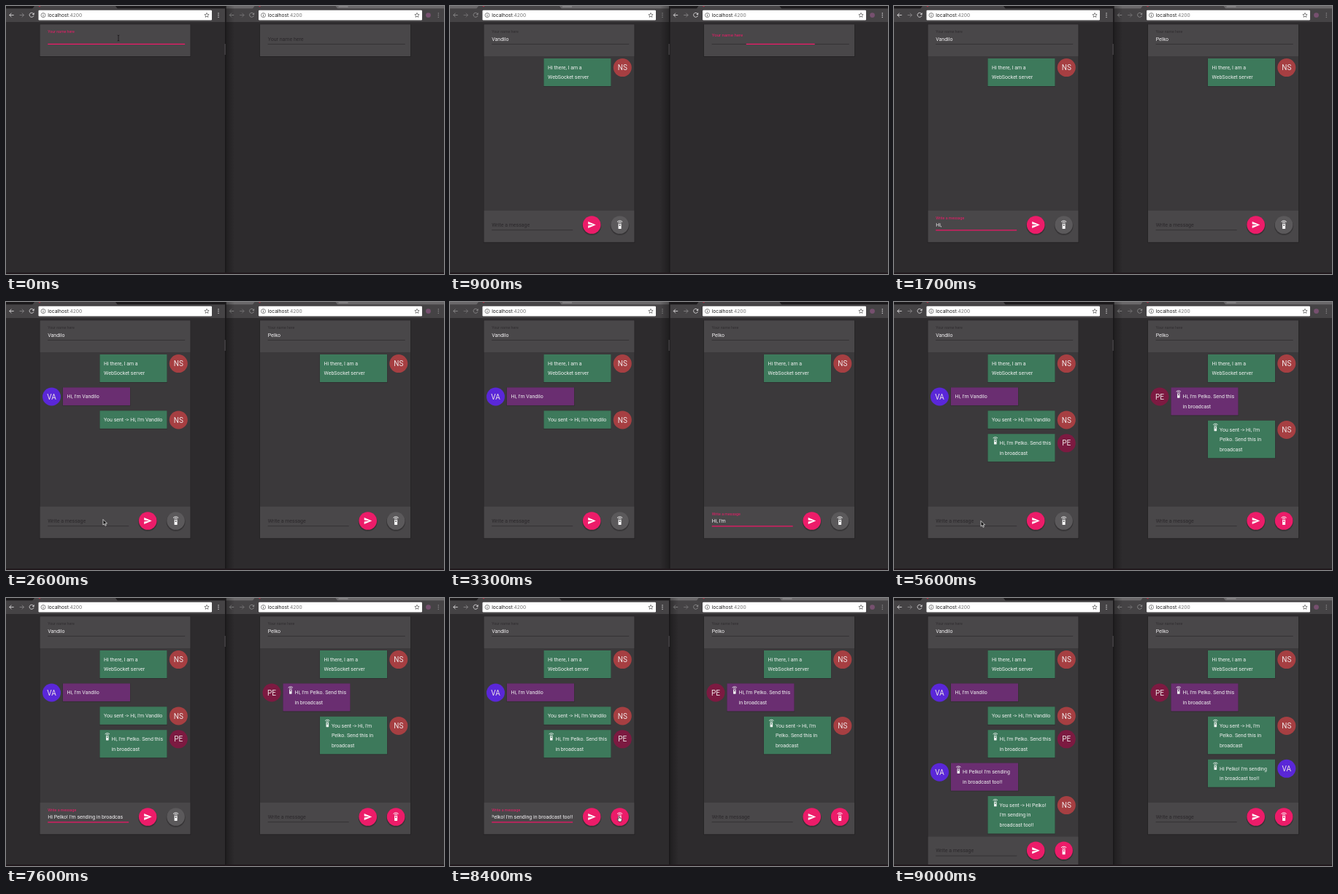
An HTML page that plays this animation: 600 px wide and 368 px high, repeating every 9100 ms.

```html
<!DOCTYPE html>
<html lang="en">
<head>
<meta charset="utf-8">
<title>Two chat windows</title>
<style>
html, body { margin: 0; width: 100%; height: 100%; overflow: hidden; background: #2d2b2d; }
#stage { display: block; width: 600px; height: 368px; }
text { font-family: Roboto, "Open Sans", sans-serif; font-size: 7px; white-space: pre; }
.url { font-family: Inter, Roboto, sans-serif; font-size: 6.65px; }
.initials { font-size: 10px; text-anchor: middle; fill: #eee4e6; }
</style>
</head>
<body>
<svg id="stage" viewBox="0 0 600 368" xmlns="http://www.w3.org/2000/svg"></svg>
<script>
const LOOP = 9100, STEP = 100;
const PINK = '#ec1c69', GREEN = '#3d795b', PURPLE = '#6a2e71';
const PAGE = '#2d2b2d', CARD = '#494749', CHAT = '#3b393b';
const SECOND_X = 301.5;

const stage = document.getElementById('stage');
const pen = document.createElement('canvas').getContext('2d');

const people = {
  server: { initials: 'NS', color: '#a63f42' },
  left: { initials: 'VA', color: '#5a27d8' },
  right: { initials: 'PE', color: '#7c1a41' }
};

// Typing runs: text appears evenly between from and to, and is cleared at end.
const sides = {
  left: {
    dx: 0, who: 'left', barEnd: 282,
    name: { text: 'Vandilo', from: 50, to: 450, focus: [[-500, 650]] },
    open: 600,
    drafts: [
      { text: "Hi, I'm Vandilo", from: 1500, to: 2250, end: 2400 },
      { text: "Hi Pelko! I'm sending in broadcast too!!", from: 5850, to: 7950, end: 8600 }
    ],
    draftFocus: [[1400, 2600], [5700, 8500]],
    castAt: 8400,
    messages: [
      { at: 700, from: 'server', lines: ['Hi there, I am a', 'WebSocket server'] },
      { at: 2400, from: 'left', lines: ["Hi, I'm Vandilo"] },
      { at: 2500, from: 'server', lines: ["You sent -> Hi, I'm Vandilo"] },
      { at: 5300, from: 'right', cast: true, lines: ["Hi, I'm Pelko. Send this", 'in broadcast'] },
      { at: 8600, from: 'left', cast: true, lines: ["Hi Pelko! I'm sending", 'in broadcast too!!'] },
      { at: 8700, from: 'server', cast: true, lines: ['You sent -> Hi Pelko!', "I'm sending in", 'broadcast too!!'] }
    ]
  },
  right: {
    dx: SECOND_X, who: 'right', barEnd: 268.5,
    name: { text: 'Pelko', from: 850, to: 1150, focus: [[800, 1300]] },
    open: 1200,
    drafts: [{ text: "Hi, I'm Pelko. Send this in broadcast", from: 2960, to: 4650, end: 5300 }],
    draftFocus: [[2850, 5250]],
    castAt: 5200,
    messages: [
      { at: 1300, from: 'server', lines: ['Hi there, I am a', 'WebSocket server'] },
      { at: 5300, from: 'right', cast: true, lines: ["Hi, I'm Pelko. Send this", 'in broadcast'] },
      { at: 5400, from: 'server', cast: true, lines: ["You sent -> Hi, I'm", 'Pelko. Send this in', 'broadcast'] },
      { at: 8600, from: 'left', cast: true, lines: ["Hi Pelko! I'm sending", 'in broadcast too!!'] }
    ]
  }
};

// Spans in which the right window is in front.
const rightActive = [[750, 1350], [2750, 5500]];

// Pointer moves: [start, end, hide, x0, y0, x1, y1, shape on arrival]
const moves = [
  [0, 0, 100, 154, 44, 154, 44, 'beam'],
  [550, 750, 900, 154, 44, 452, 45, 'beam'],
  [1200, 1400, 1600, 452, 45, 110, 302, 'beam'],
  [2550, 2850, 3000, 110, 302, 420, 302, 'beam'],
  [4700, 5000, 5300, 420, 302, 534, 307, 'hand'],
  [5300, 5600, 5900, 534, 307, 119, 304, 'arrow'],
  [8050, 8300, 8700, 119, 304, 232, 303, 'hand']
];

const clamp = v => Math.max(0, Math.min(1, v));
const ease = v => { v = clamp(v); return v * v * (3 - 2 * v); };
const within = (t, spans) => spans.some(([a, b]) => t >= a && t < b);
const escape = s => s.replace(/&/g, '&amp;').replace(/</g, '&lt;').replace(/>/g, '&gt;');
const rect = (x, y, w, h, fill, more = '') =>
  `<rect x="${x}" y="${y}" width="${w}" height="${h}" fill="${fill}" ${more}/>`;
const disc = (x, y, r, fill, more = '') => `<circle cx="${x}" cy="${y}" r="${r}" fill="${fill}" ${more}/>`;
const label = (x, y, s, fill, more = '') => `<text x="${x}" y="${y}" fill="${fill}" ${more}>${escape(s)}</text>`;
const stroke = (d, color, w = 1) => `<path d="${d}" fill="none" stroke="${color}" stroke-width="${w}"/>`;
const at = (x, y, scale, body) => `<g transform="translate(${x} ${y}) scale(${scale})">${body}</g>`;

// Remote control with two waves, centred on 0,0 in a 24 unit box.
const remoteIcon = color =>
  `<path fill="${color}" fill-rule="evenodd" d="M-3-3h6a1 1 0 0 1 1 1v12a1 1 0 0 1-1 1h-6a1 1 0 0 1-1-1v-12a1 1 0 0 1 1-1zM0-1a2 2 0 1 0 0 4a2 2 0 1 0 0-4z"/>` +
  stroke('M-4.2-5.2a6 6 0 0 1 8.4 0M-7.1-8.1a10 10 0 0 1 14.2 0', color, 2);
const sendIcon = '<path fill="#fff" d="M-10 9L11 0-10-9v7L5 0-10 2z"/>';

function typed({ text, from, to }, t) {
  return text.slice(0, Math.floor(text.length * clamp((t - from) / (to - from)) + 0.01));
}

function field(x, base, width, hint, value, spans, t) {
  const span = spans.find(([a, b]) => t >= a && t < b);
  const grow = span ? ease((t - span[0]) / 200) : 0;
  const lift = value ? 1 : grow;
  const color = span ? PINK : value ? '#302d30' : '#2b282b';
  pen.font = '7px Roboto, "Open Sans", sans-serif';
  const shift = Math.min(0, width - pen.measureText(value).width);
  const line = base + 4.4;
  return label(x, base - 10.2 * lift, hint, color, `style="font-size:${7 - 1.75 * lift}px"`) +
    rect(x, line, width, 0.7, '#2b292b') +
    (grow ? rect(x + width * (1 - grow) / 2, line - 0.2, width * grow, 1.3, PINK) : '') +
    `<svg x="${x}" y="${base - 8}" width="${width + 0.5}" height="12">${label(shift, 8, value, '#f2f0f2')}</svg>`;
}

function button(x, y, fill, icon) {
  return disc(x, y + 1.5, 13, '#000', 'opacity=".16"') + disc(x, y + 0.7, 12.8, '#000', 'opacity=".16"') +
    disc(x, y, 12.3, fill) + at(x, y, 0.5, icon);
}

function bubble(m, y, own) {
  const x = own ? 78 : 128.5;
  const height = 11 + 13.5 * m.lines.length;
  const { initials, color } = people[m.from];
  const textX = x + (m.cast ? 16 : 5.6);
  const faceX = own ? 62.5 : 236.3;
  return rect(x - 0.5, y, 93, height + 1, '#000', 'opacity=".18"') +
    rect(x, y, 92, height, own ? PURPLE : GREEN) +
    (m.cast ? at(x + 10.3, y + 9.4, 0.45, remoteIcon('#eef2f0')) : '') +
    m.lines.map((s, i) => label(textX, y + 14.8 + 13.5 * i, s, '#eef0ef')).join('') +
    disc(faceX, y + 12.6, 12.5, color) + label(faceX, y + 16.2, initials, '', 'class="initials"');
}

function toolbar(side, active) {
  const end = side.barEnd;
  const strip = active ? '#1b191b' : '#6a686a';
  const bright = active ? '#d8d6d8' : '#8b898b';
  const dim = active ? '#858385' : '#737173';
  const arrow = (x, dir, c) => stroke(`M${x - 3} 12.5h6M${x + 3 * dir} 12.5l${-2.8 * dir}-2.8m0 5.6l${2.8 * dir}-2.8`, c, 0.9);
  const star = Array.from({ length: 10 }, (_, i) => {
    const a = -Math.PI / 2 + i * Math.PI / 5, r = i % 2 ? 1.5 : 3.3;
    return `${(end - 7 + r * Math.cos(a)).toFixed(2)},${(12.7 + r * Math.sin(a)).toFixed(2)}`;
  }).join(' ');
  const menuX = side.dx ? 290.8 : 291;
  return rect(0, 0, 300, 4, strip) +
    `<path d="M36 4L39 0H150L153 4z" fill="#454345"/>` +
    (active ? '' : rect(154, 0, 13, 2, '#828082')) +
    disc(46, -0.2, 1.4, '#a83244') +
    rect(0, 3.4, 300, 18.6, '#454345') +
    arrow(7.7, -1, bright) + arrow(21.6, 1, dim) +
    stroke('M37.7 10.8a3 3 0 1 0 .3 2.3', bright, 0.9) + `<path d="M38.6 9v2.9h-2.9z" fill="${bright}"/>` +
    rect(44.5, 5.8, end - 44.5, 13.6, '#fff', 'rx="1.2"') +
    `<circle cx="51" cy="12.6" r="3" fill="none" stroke="#555" stroke-width=".7"/>` +
    rect(50.6, 12, 0.8, 2.4, '#555') + rect(50.6, 10.6, 0.8, 0.8, '#555') +
    `<text class="url" x="57.2" y="15" fill="#1d1d1d">localhost<tspan fill="#777">:4200</tspan></text>` +
    `<polygon points="${star}" fill="none" stroke="#555" stroke-width=".7"/>` +
    (side.dx ? disc(277, 12.6, 3.4, '#76506f') : '') +
    [10, 12.6, 15.2].map(y => disc(menuX, y, 0.75, bright)).join('');
}

function browser(side, active, t) {
  let out = rect(0, 0, 300, 368, PAGE);
  const open = t >= side.open;
  let y = 72, chat = '';
  for (const m of side.messages) {
    if (t < m.at) break;
    chat += bubble(m, y, m.from === side.who);
    y += 18.4 + 13.5 * m.lines.length;
  }
  const foot = Math.max(281, y - 3.6);
  const bottom = open ? foot + 43.3 : 69;
  out += rect(45.8, 25, 207.4, bottom - 24, '#000', 'opacity=".2"');
  if (open) {
    const draft = side.drafts.find(d => t >= d.from && t < d.end);
    out += rect(46.5, 69, 206, foot - 69, CHAT) + chat +
      rect(46.5, foot, 206, 43.3, CARD) +
      field(57.2, foot + 22, 111, 'Write a message', draft ? typed(draft, t) : '', side.draftFocus, t) +
      button(194.2, foot + 19.5, PINK, sendIcon) +
      button(232.6, foot + 19.5, t >= side.castAt ? PINK : '#5b595b', remoteIcon('#fff'));
  }
  out += rect(46.5, 25.3, 206, 43.7, CARD) +
    field(57.2, 47.5, 188, 'Your name here', typed(side.name, t), side.name.focus, t) +
    toolbar(side, active);
  return at(side.dx, 0, 1, out);
}

function pointer(t) {
  const move = moves.find(([start, , hide]) => t >= start && t < hide);
  if (!move) return '';
  const [start, end, , x0, y0, x1, y1, kind] = move;
  const k = end > start ? ease((t - start) / (end - start)) : 1;
  const shape = k < 1 ? 'arrow' : kind;
  const art = {
    beam: stroke('M-1.3-4l1.3 .6 1.3-.6M0-3.4V3.4M-1.3 4l1.3-.6 1.3 .6', '#171517', 0.8),
    arrow: '<path d="M0-3.5v7.6l1.8-1.6 1.2 2.8 1.3-.6-1.2-2.7h2.4z" fill="#111" stroke="#fff" stroke-width=".7"/>',
    hand: '<path d="M-1.2-3.2q.8-.8 1.4 0v2.4l2.7.6q.7.3.5 1.3l-.7 3h-3.4l-2.2-3.2q0-1 .9-.5l.8.7z" fill="#fff" stroke="#111" stroke-width=".6"/>'
  }[shape];
  return at(x0 + (x1 - x0) * k, y0 + (y1 - y0) * k, 1, art);
}

const shades = `<defs><linearGradient id="fade">
  <stop offset="0" stop-color="#000" stop-opacity=".3"/><stop offset="1" stop-color="#000" stop-opacity="0"/>
</linearGradient></defs>`;

function draw(t) {
  const rightFront = within(t, rightActive);
  const shade = rect(0, 0, 12, 368, 'url(#fade)');
  stage.innerHTML = shades +
    browser(sides.left, !rightFront, t) + browser(sides.right, rightFront, t) +
    (rightFront ? `<g transform="translate(300 0) scale(-1 1)">${shade}</g>` : at(301, 0, 1, shade)) +
    rect(300, 0, 1.5, 368, '#1a181a') + rect(299.6, 52, 1, 15, '#555355') +
    rect(0, 366, 600, 2, '#21191d') + pointer(t);
}

const begin = performance.now();
let shown = -1;
function tick(now) {
  const t = Math.floor(Math.max(0, now - begin) % LOOP / STEP) * STEP;
  if (t !== shown) draw(shown = t);
  requestAnimationFrame(tick);
}
draw(shown = 0);
requestAnimationFrame(tick);
</script>
</body>
</html>
```
